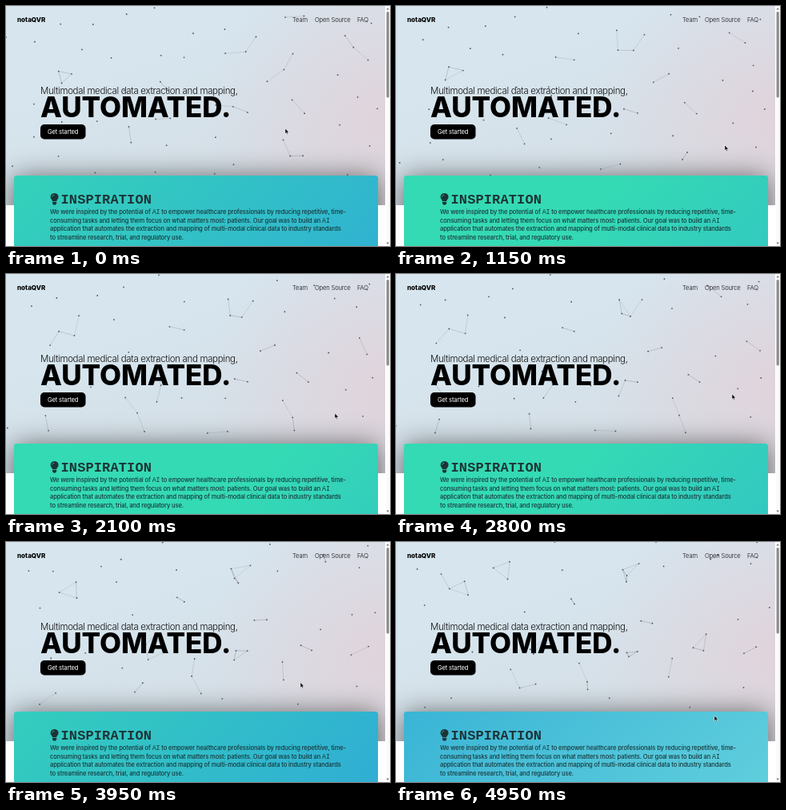
An HTML page with a canvas for the animation above (5 s loop, 480 by 300 pixels).

```html
<!DOCTYPE html>
<html lang="en">
<head>
<meta charset="utf-8">
<style>
html, body { margin: 0; width: 100%; height: 100%; overflow: hidden; background: #fff; }
#stage { position: relative; width: 480px; height: 300px; overflow: hidden; }
#stage > *, .card { position: absolute; }
#hero {
  width: 474px; height: 249px; overflow: hidden;
  background:
    radial-gradient(circle at 100% 56%, #e4cfd8bb, #e4cfd800 220px),
    linear-gradient(160deg, #d6e5ee 30%, #d5dbe1);
}
.card { left: 9.5px; top: 211.5px; width: 455.5px; height: 120px; border-radius: 3px; }
.shadow { box-shadow: 0 3px 34px #0009; }
#bar { left: 474.5px; width: 5.5px; height: 300px; background: #fafafa; }
canvas, svg { left: 0; top: 0; }
text { font: 300 7.6px Inter, sans-serif; letter-spacing: -.16px; fill: #111; }
.brand { font-weight: 800; font-size: 8px; letter-spacing: 0; fill: #000; }
.lead { font-size: 11.5px; letter-spacing: -.34px; }
.title { font-weight: 800; font-size: 35px; letter-spacing: -.1px; fill: #000; }
.button { font-weight: 400; fill: #fff; }
.heading { font: 700 17px "Liberation Mono", monospace; letter-spacing: .12px; fill: #1d3436; }
.body { font-weight: 500; letter-spacing: -.13px; fill: #19383b; }
.mono { font-family: "Liberation Mono", monospace; font-size: 8.4px; }
</style>
</head>
<body>
<div id="stage">
  <div id="hero"><div class="card shadow"></div></div>
  <canvas id="net" width="480" height="300"></canvas>
  <div id="card" class="card"></div>
  <div id="bar"></div>
  <svg width="480" height="300">
    <text class="brand" x="14" y="19.5">notaQVR</text>
    <text x="358" y="19.5">Team</text>
    <text x="386" y="19.5">Open Source</text>
    <text x="439" y="19.5">FAQ</text>
    <text class="lead" x="43" y="109.5">Multimodal medical data extraction and mapping,</text>
    <text class="title" x="43" y="139">AUTOMATED.</text>
    <rect x="43" y="148" width="56.5" height="18.5" rx="5"/>
    <text class="button" x="52" y="160">Get started</text>

    <g fill="#1d3436">
      <path d="M58 244.2C58 242.2 55.6 241.6 55.6 238.8A5 4.9 0 0 1 65.6 238.8C65.6 241.6 63.2 242.2 63.2 244.2Z"/>
      <path d="M58 245H63.2V246.4Q62.6 248.8 60.6 248.8T58 246.4Z"/>
    </g>
    <path d="M57.6 238.6Q57.8 236.2 60.4 236" fill="none" stroke="#35cfbd" stroke-width=".7"/>
    <text class="heading" x="68.5" y="247">INSPIRATION</text>
    <text class="body" x="55" y="260">We were inspired by the potential of <tspan class="mono">AI</tspan> to empower healthcare professionals by reducing repetitive, time-</text>
    <text class="body" x="55" y="270.6">consuming tasks and letting them focus on what matters most: patients. Our goal was to build an <tspan class="mono">AI</tspan></text>
    <text class="body" x="55" y="281.2">application that automates the extraction and mapping of multi-modal clinical data to industry standards</text>
    <text class="body" x="55" y="291.8">to streamline research, trial, and regulatory use.</text>

    <rect x="475.6" y="7" width="3.2" height="107.5" rx="1.6" fill="#8b8b8b"/>
    <path d="M475.5 4.4L477.2 2L478.9 4.4ZM475.5 295.6L477.2 298L478.9 295.6Z" fill="#777"/>
    <path id="cursor" d="M0 0V6.6L1.5 5.3L2.5 7.5L3.5 7L2.6 4.9H4.6Z" stroke="#fff" stroke-width=".5"/>
  </svg>
</div>
<script>
const LOOP = 5, STEP = .05;
const COLS = 12, ROWS = 5, WIDTH = 474, HEIGHT = 212;
const SPEED = 7, LINK = 26;
const ctx = net.getContext('2d');

// seconds, x, y
const cursorKeys = [
  [0, 349, 153], [1.15, 411, 174], [2.1, 411, 174], [2.8, 420, 150],
  [3.6, 364, 157], [4.3, 372, 194], [4.95, 398, 217]
];

let seed = 7;
const random = () => (seed = seed * 16807 % 2147483647) / 2147483647;
const drift = () => (random() * 2 - 1) * SPEED;

// One drifting dot somewhere in each cell of a loose grid
const dots = Array.from({ length: COLS * ROWS }, (_, i) => ({
  x: (i % COLS + random()) * WIDTH / COLS,
  y: (Math.floor(i / COLS) + random()) * HEIGHT / ROWS,
  vx: drift(),
  vy: drift()
}));

function drawNet(t) {
  const points = dots.map(d => [d.x + d.vx * t, d.y + d.vy * t]);
  ctx.clearRect(0, 0, 480, 300);
  ctx.lineWidth = .5;
  ctx.fillStyle = '#50555c';
  points.forEach(([x, y], i) => {
    for (const [u, v] of points.slice(i + 1)) {
      const gap = Math.hypot(u - x, v - y);
      if (gap > LINK) continue;
      ctx.strokeStyle = `rgba(50, 55, 65, ${.7 - .5 * gap / LINK})`;
      ctx.beginPath();
      ctx.moveTo(x, y);
      ctx.lineTo(u, v);
      ctx.stroke();
    }
    ctx.beginPath();
    ctx.arc(x, y, .9, 0, 7);
    ctx.fill();
  });
}

function moveCursor(t) {
  const i = Math.max(1, cursorKeys.findIndex(k => k[0] >= t - 1e-6));
  const [t0, x0, y0] = cursorKeys[i - 1], [t1, x1, y1] = cursorKeys[i];
  const k = (t - t0) / (t1 - t0);
  cursor.setAttribute('transform', `translate(${x0 + (x1 - x0) * k} ${y0 + (y1 - y0) * k})`);
}

// A wide gradient slides right, then back left past its start
function slideGradient(t) {
  const mid = 190 - 23 * (t - 1.9) ** 2;
  card.style.background =
    `linear-gradient(135deg, #34dab4 ${mid - 130}%, #30aed4 ${mid}%, #68d4de ${mid + 140}%)`;
}

function frame() {
  const t = Math.floor(performance.now() / 1000 % LOOP / STEP) * STEP;
  drawNet(t);
  moveCursor(t);
  slideGradient(t);
  requestAnimationFrame(frame);
}
frame();
</script>
</body>
</html>
```
